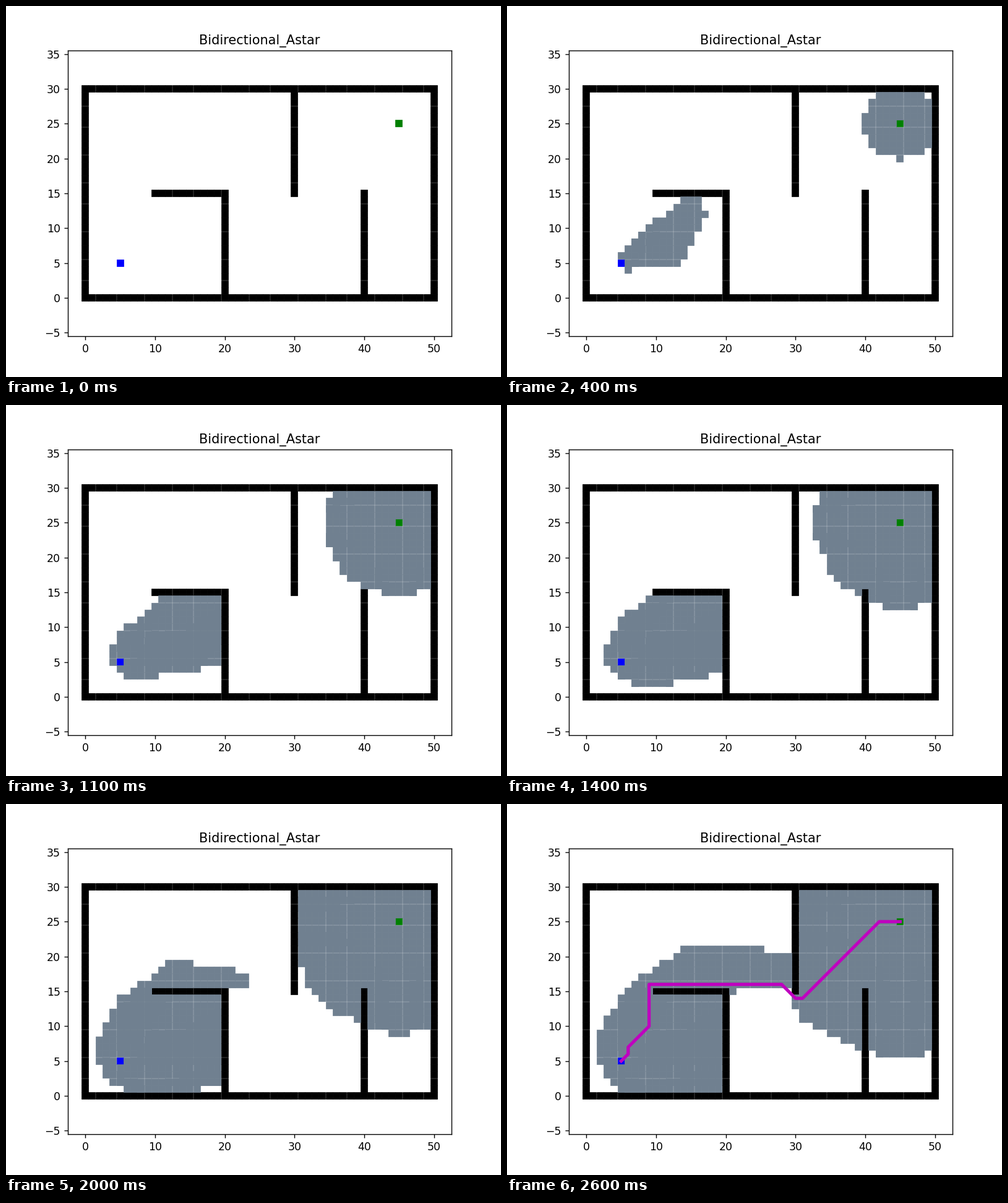
Recreate the animation shown at these times as a matplotlib script. Size 800x600 px, loop 2.7 s.

```python
import math

import matplotlib.pyplot as plt
from matplotlib.animation import FuncAnimation

START, GOAL = (5, 5), (45, 25)
WIDTH, HEIGHT = 51, 31
FRAMES, INTERVAL = 27, 100
CELLS_PER_FRAME = 20
MOTIONS = [(-1, 0), (-1, 1), (0, 1), (1, 1),
           (1, 0), (1, -1), (0, -1), (-1, -1)]


def build_walls():
    walls = {(x, y) for x in range(WIDTH) for y in (0, HEIGHT - 1)}
    walls |= {(x, y) for x in (0, WIDTH - 1) for y in range(HEIGHT)}
    walls |= {(x, 15) for x in range(10, 21)}
    walls |= {(20, y) for y in range(15)}
    walls |= {(30, y) for y in range(15, 30)}
    walls |= {(40, y) for y in range(16)}
    return walls


WALLS = build_walls()


def distance(a, b):
    return math.hypot(b[0] - a[0], b[1] - a[1])


def blocked(a, b):
    if a in WALLS or b in WALLS:
        return True
    # Only rising diagonals are kept from cutting corners.
    rising = (b[0] - a[0]) * (b[1] - a[1]) > 0
    return rising and ((a[0], b[1]) in WALLS or (b[0], a[1]) in WALLS)


class Search:
    """One direction of the search; cells are ranked by cost plus distance to GOAL."""

    def __init__(self, root):
        self.cost = {root: 0.0}
        self.parent = {root: root}
        self.open = [(distance(root, GOAL), root)]
        self.closed = []

    def pop(self):
        item = min(self.open)
        self.open.remove(item)
        return item[1]

    def expand(self, cell):
        self.closed.append(cell)
        for dx, dy in MOTIONS:
            near = (cell[0] + dx, cell[1] + dy)
            if blocked(cell, near):
                continue
            cost = self.cost[cell] + distance(cell, near)
            if cost < self.cost.get(near, math.inf):
                self.cost[near] = cost
                self.parent[near] = cell
                self.open.append((cost + distance(near, GOAL), near))

    def trace(self, cell):
        path = [cell]
        while self.parent[cell] != cell:
            cell = self.parent[cell]
            path.append(cell)
        return path


def search_both_ways():
    fore, back = Search(START), Search(GOAL)
    meet = START
    while fore.open and back.open:
        cell = fore.pop()
        if cell in back.parent:
            meet = cell
            break
        fore.expand(cell)
        cell = back.pop()
        if cell in fore.parent:
            meet = cell
            break
        back.expand(cell)
    path = fore.trace(meet)[::-1] + back.trace(meet)[1:]
    return path, fore.closed[1:], back.closed[1:]


def columns(cells):
    return [c[0] for c in cells], [c[1] for c in cells]


path, seen_fore, seen_back = search_both_ways()

fig, ax = plt.subplots(figsize=(6.4, 4.8), dpi=125)
ax.plot(*START, "bs")
ax.plot(*GOAL, "gs")
ax.plot(*columns(sorted(WALLS)), "sk")
seen_line, = ax.plot([], [], linestyle="none", marker="s", color="slategray")
path_line, = ax.plot([], [], color="m", linewidth=3)
ax.set_title("Bidirectional_Astar")
ax.axis("equal")


def update(frame):
    count = CELLS_PER_FRAME * frame
    seen_line.set_data(*columns(seen_fore[:count] + seen_back[:count]))
    path_line.set_data(*columns(path if frame == FRAMES - 1 else []))
    return seen_line, path_line


anim = FuncAnimation(fig, update, frames=FRAMES, interval=INTERVAL,
                     repeat=True, repeat_delay=0, blit=False)
plt.show()
```
